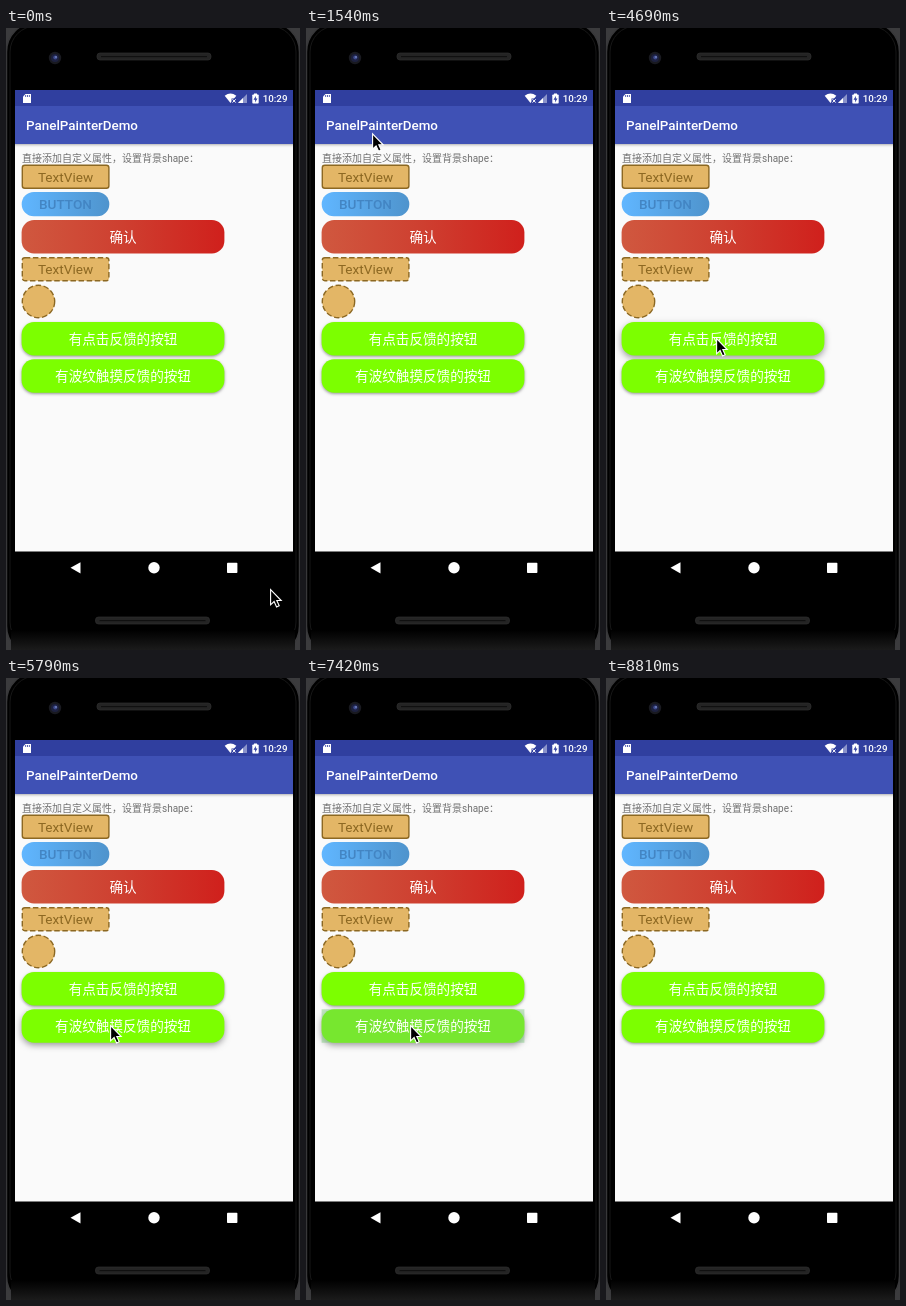
Animation of 294x622 px, one loop 9.62 s. Source, as an HTML page with a canvas:

```html
<!DOCTYPE html>
<html lang="zh">
<head>
<meta charset="utf-8">
<title>Button states</title>
<style>
html, body { margin: 0; width: 100%; height: 100%; overflow: hidden; background: #000; }
canvas { display: block; width: 294px; height: 622px; }
</style>
</head>
<body>
<canvas id="stage"></canvas>
<script>
const W = 294, H = 622, LOOP = 9620;
const canvas = document.getElementById('stage');
const ctx = canvas.getContext('2d');
const dpr = window.devicePixelRatio || 1;
canvas.width = W * dpr;
canvas.height = H * dpr;

const LATIN = 'Roboto, "Noto Sans CJK SC", "Noto Sans CJK", sans-serif';
const CJK = '"Noto Sans CJK SC", "Noto Sans CJK", sans-serif';
const GOLD = '#e3b666', BROWN = '#8c6822', LIME = '#7cff00', TOUCH = '113,198,113';

// Pointer tip: time, x, y
const path = [
  [0, 264, 561], [420, 264, 561], [640, 205, 355], [890, 115, 96], [1040, 115, 96],
  [1270, 92, 17], [1430, 69, 62], [1540, 66, 105], [1660, 66, 136], [2260, 66, 136],
  [2340, 101, 130], [2600, 101, 130], [2860, 79, 195], [3190, 102, 280],
  [3420, 109, 310], [4480, 109, 310], [4490, 110, 310], [4690, 110, 310],
  [5100, 104, 347], [7640, 104, 347], [7800, 108, 311], [8150, 108, 311],
  [8450, 150, 430], [8800, 233, 622], [LOOP, 233, 622]
];

const clamp = v => Math.max(0, Math.min(1, v));
const ramp = (t, start, len) => clamp((t - start) / len);
const pulse = (t, on, inLen, off, outLen) => ramp(t, on, inLen) * (1 - ramp(t, off, outLen));

// Tangent through a key; zero where the pointer rests
function slope(i, axis) {
  const a = path[i - 1], b = path[i], c = path[i + 1];
  const still = (p, q) => p[1] === q[1] && p[2] === q[2];
  if (!a || !c || still(a, b) || still(b, c)) return 0;
  return (c[axis] - a[axis]) / (c[0] - a[0]);
}

function pointerAt(t) {
  let i = 0;
  while (i < path.length - 2 && t >= path[i + 1][0]) i++;
  const a = path[i], b = path[i + 1], d = b[0] - a[0], u = (t - a[0]) / d;
  const u2 = u * u, u3 = u2 * u;
  return [1, 2].map(k =>
    (2 * u3 - 3 * u2 + 1) * a[k] + (u3 - 2 * u2 + u) * d * slope(i, k) +
    (3 * u2 - 2 * u3) * b[k] + (u3 - u2) * d * slope(i + 1, k));
}

function rect(x, y, w, h, fill) {
  ctx.fillStyle = fill;
  ctx.fillRect(x, y, w, h);
}

function round(x, y, w, h, r, fill) {
  ctx.beginPath();
  ctx.roundRect(x, y, w, h, r);
  if (fill) { ctx.fillStyle = fill; ctx.fill(); }
}

function circle(x, y, r, fill) {
  ctx.beginPath();
  ctx.arc(x, y, r, 0, Math.PI * 2);
  ctx.fillStyle = fill;
  ctx.fill();
}

function poly(points, fill) {
  ctx.beginPath();
  points.forEach(p => ctx.lineTo(p[0], p[1]));
  ctx.closePath();
  ctx.fillStyle = fill;
  ctx.fill();
}

function outline(color, width, dash = []) {
  ctx.setLineDash(dash);
  ctx.strokeStyle = color;
  ctx.lineWidth = width;
  ctx.stroke();
  ctx.setLineDash([]);
}

function text(str, x, y, font, color, align = 'left') {
  ctx.font = font;
  ctx.fillStyle = color;
  ctx.textAlign = align;
  ctx.fillText(str, x, y);
}

function gradient(x0, y0, x1, y1, ...colors) {
  const g = ctx.createLinearGradient(x0, y0, x1, y1);
  colors.forEach((c, i) => g.addColorStop(i / (colors.length - 1), c));
  return g;
}

function withShadow(blur, dy, alpha, draw) {
  ctx.save();
  ctx.shadowColor = `rgba(0,0,0,${alpha})`;
  ctx.shadowBlur = blur * dpr;
  ctx.shadowOffsetY = dy * dpr;
  draw();
  ctx.restore();
}

function speaker(x, y) {
  round(x, y, 114, 7, 3, '#242424');
  outline('#303030', 0.7);
  rect(x + 4, y + 3, 106, 1.2, '#101010');
}

function phone() {
  rect(0, 0, W, H, '#3b3b3d');
  round(0.5, -6, 293, 634, 30, '#000');
  outline('#38383a', 1.5);
  round(4, -2, 286, 622, 26);
  outline('#171717', 1);
  rect(5, 602, 284, 20, gradient(0, 602, 0, 622, '#000', '#1b1b1b'));
  circle(49, 30, 6.2, '#191a20');
  circle(49, 30, 4, '#1d2140');
  circle(49.3, 29.5, 2, '#3c4a8c');
  circle(50, 29, 0.8, '#9aa6d8');
  speaker(91, 25);
  speaker(89.5, 589);
}

function statusIcons() {
  poly([[19.5, 66], [25, 66], [25, 75], [17, 75], [17, 68.5]], '#fff');
  for (let i = 0; i < 3; i++) rect(19.3 + i * 1.8, 67, 0.8, 2, '#303f9f');

  ctx.beginPath();
  ctx.moveTo(224.5, 75);
  ctx.lineTo(218.7, 67.8);
  ctx.quadraticCurveTo(224.5, 63.4, 230.3, 67.8);
  ctx.closePath();
  ctx.fillStyle = '#fff';
  ctx.fill();
  rect(225.5, 70.5, 5, 5, '#303f9f');
  ctx.beginPath();
  ctx.moveTo(226.5, 71.3); ctx.lineTo(229.7, 74.6);
  ctx.moveTo(229.7, 71.3); ctx.lineTo(226.5, 74.6);
  outline('#fff', 1);

  poly([[241, 66], [241, 75], [232, 75]], '#8a93cb');
  poly([[237, 70], [237, 75], [232, 75]], '#fff');

  rect(248, 65.5, 3, 1.5, '#fff');
  round(246.3, 66.5, 6.4, 9, 0.8, '#fff');
  poly([[250, 67.8], [247.5, 71.7], [249.2, 71.7], [249, 74.5], [251.5, 70.5], [249.8, 70.5]], '#303f9f');
  text('10:29', 281.5, 74, `500 9.8px ${LATIN}`, '#fff', 'right');
}

function bars() {
  rect(9, 62, 278, 461.5, '#fafafa');
  ctx.save();
  ctx.beginPath();
  ctx.rect(9, 62, 278, 461);
  ctx.clip();
  withShadow(3, 1.2, 0.4, () => rect(4, 78, 288, 38, '#3f51b5'));
  rect(9, 62, 278, 16, '#303f9f');
  ctx.restore();
  statusIcons();
  text('PanelPainterDemo', 20, 102.3, `500 13.4px ${LATIN}`, '#fff');
  poly([[64.5, 539.8], [74.5, 534.2], [74.5, 545.4]], '#fff');
  circle(148, 539.8, 5.7, '#fff');
  round(221, 534.7, 10.4, 10.4, 0.8, '#fff');
}

function tag(y, dash) {
  round(16.3, y, 86.6, 23, 2.5, GOLD);
  outline(BROWN, 1.4, dash);
  text('TextView', 59.5, y + 16.6, `13.6px ${LATIN}`, BROWN, 'center');
}

function widgets() {
  text('直接添加自定义属性，设置背景shape：', 16, 133.6, `10px ${LATIN}`, '#707070');
  tag(137.2);
  round(15.7, 164, 87.6, 24.3, 12.1, gradient(16, 0, 103, 0, '#60b6ff', '#4f94cd'));
  text('BUTTON', 59.5, 181.2, `500 13.6px ${LATIN}`, '#4385c3', 'center');
  round(15.6, 192, 202.8, 33.4, 12.5, gradient(16, 0, 218, 0, '#d0583f', '#ce3f30', '#d0201c'));
  text('确认', 117, 213.8, `13.6px ${CJK}`, '#fff', 'center');
  tag(229.7, [5.5, 2.6]);
  ctx.beginPath();
  ctx.arc(32.5, 273.5, 16.2, 0, Math.PI * 2);
  ctx.fillStyle = GOLD;
  ctx.fill();
  outline(BROWN, 1.4, [5.5, 2.6]);
}

function button(y, label, color, lift, ripple) {
  withShadow(3 + 3 * lift, 1.3 + 1.2 * lift, 0.38, () => round(15.6, y, 202.8, 33.4, 12.5, color));
  if (ripple && ripple.alpha > 0) {
    ctx.save();
    ctx.beginPath();
    ctx.rect(15.6, y, 202.8, 33.4);
    ctx.clip();
    circle(104 + 13 * ripple.grow, y + 17, 6 + 104 * ripple.grow, `rgba(${TOUCH},${0.42 * ripple.alpha})`);
    ctx.restore();
  }
  text(label, 117, y + 21.9, `13.6px ${CJK}`, '#fff', 'center');
}

function buttons(t) {
  const down = (t >= 4010 && t < 4690) || (t >= 7850 && t < 8120);
  const lift1 = Math.max(pulse(t, 4010, 60, 4690, 100), pulse(t, 7850, 40, 8120, 100));
  button(294, '有点击反馈的按钮', down ? `rgb(${TOUCH})` : LIME, lift1);

  const second = t >= 7130;
  const on = second ? 7130 : 5790, off = second ? 7470 : 6490;
  const grow = 1 - Math.pow(1 - ramp(t, on, second ? 280 : 460), 2);
  const alpha = pulse(t, on, 80, off, second ? 170 : 340);
  const lift2 = t >= on ? 1 - ramp(t, off, 120) : 0;
  button(331.3, '有波纹触摸反馈的按钮', LIME, lift2, { grow, alpha });
}

function pointer(t) {
  const [x, y] = pointerAt(t);
  if (y >= H) return;
  ctx.save();
  ctx.translate(x + 0.6, y + 0.6);
  ctx.lineJoin = 'miter';
  poly([[0, 0], [0, 15.2], [3.5, 11.9], [6, 17.4], [8.6, 16.2], [6.2, 10.9], [10.6, 10.9]], '#000');
  outline('#fff', 1.1);
  ctx.restore();
}

function draw(now) {
  const t = now % LOOP;
  ctx.setTransform(dpr, 0, 0, dpr, 0, 0);
  phone();
  bars();
  widgets();
  buttons(t);
  pointer(t);
}

const start = performance.now();
function tick() {
  draw(performance.now() - start);
  requestAnimationFrame(tick);
}
tick();
</script>
</body>
</html>
```
